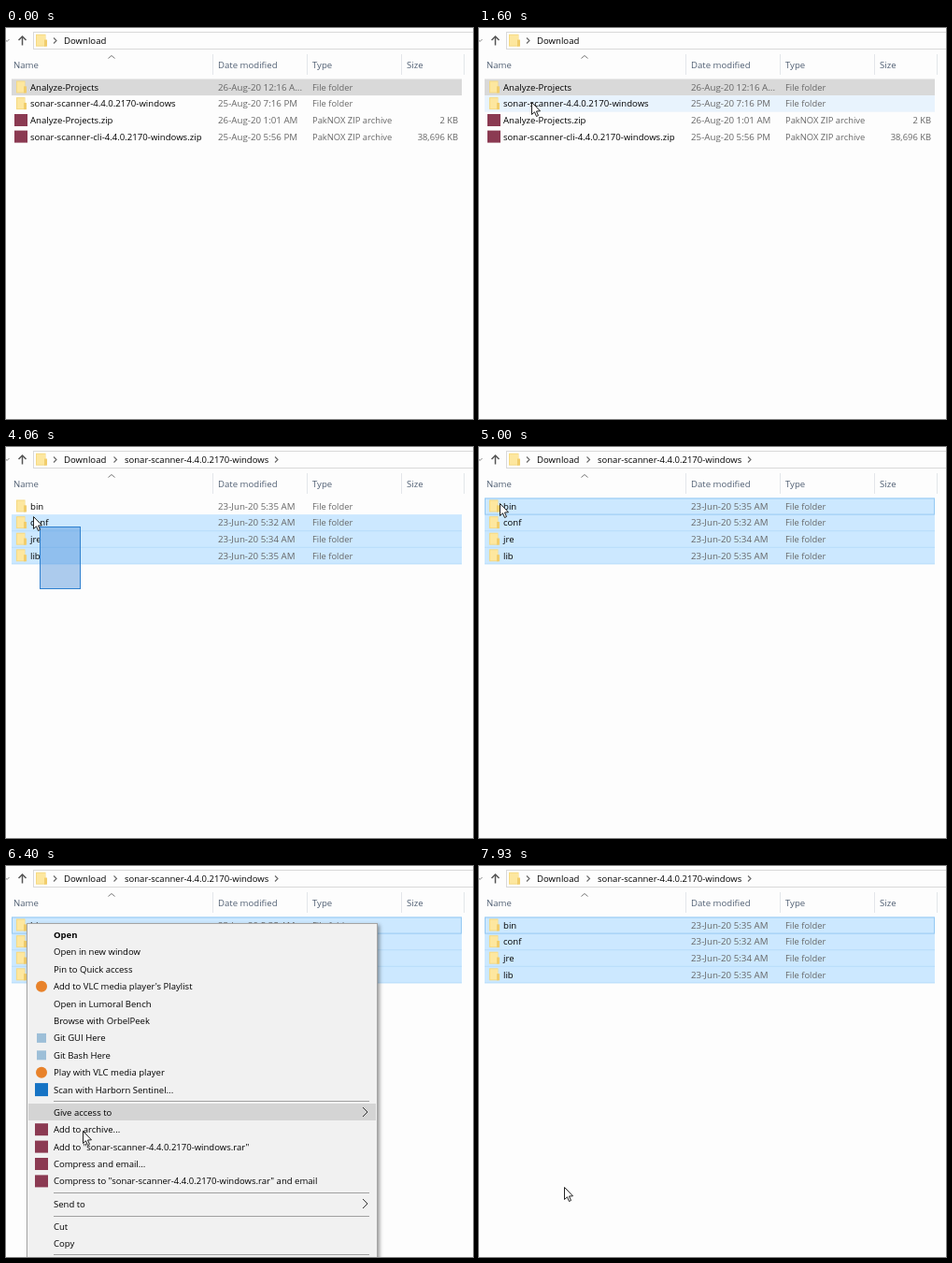
These frames come from a looping animation (500 by 418 pixels, 8000 ms). An HTML page with a canvas:

```html
<!DOCTYPE html>
<html lang="en">
<head>
<meta charset="utf-8">
<title>File browser</title>
<style>
html, body { margin: 0; width: 100%; height: 100%; overflow: hidden; background: #fdfdfd; }
canvas { display: block; width: 500px; height: 418px; }
</style>
</head>
<body>
<canvas id="stage" width="500" height="418"></canvas>
<script>
const ctx = document.getElementById('stage').getContext('2d');
const LOOP = 8000;
const FONT = '"Open Sans", "Noto Sans", sans-serif';
const ROW_TOP = 54.5, ROW_H = 17.6;

// Moments of the interaction, in ms
const APPEAR = 780, ENTER = 2100, DRAG = 3600, RELEASE = 4450, MENU = 5560, CLOSE = 7560;

// Pointer path: time, x, y
const PATH = [
  [780, 85, 127], [980, 82, 126], [1400, 56, 79], [3080, 56, 79],
  [3460, 75, 132], [3560, 79, 151], [3680, 79, 151], [4060, 29, 74],
  [4200, 22, 60], [5700, 22, 60], [6400, 82, 283], [6950, 85, 381],
  [7200, 86, 398], [7580, 86, 398], [7900, 91, 343]
];

const ROOT = [
  ['Analyze-Projects', '26-Aug-20 12:16 A...', 'File folder', ''],
  ['sonar-scanner-4.4.0.2170-windows', '25-Aug-20 7:16 PM', 'File folder', ''],
  ['Analyze-Projects.zip', '26-Aug-20 1:01 AM', 'PakNOX ZIP archive', '2 KB'],
  ['sonar-scanner-cli-4.4.0.2170-windows.zip', '25-Aug-20 5:56 PM', 'PakNOX ZIP archive', '38,696 KB']
];
const INNER = [
  ['bin', '23-Jun-20 5:35 AM', 'File folder', ''],
  ['conf', '23-Jun-20 5:32 AM', 'File folder', ''],
  ['jre', '23-Jun-20 5:34 AM', 'File folder', ''],
  ['lib', '23-Jun-20 5:35 AM', 'File folder', '']
];
const INNER_TITLE = ROOT[1][0];

// Menu groups: centre of the first line, then label and icon pairs
const PITCH = 18.4;
const GROUPS = [
  [73.5, ['Open'], ['Open in new window'], ['Pin to Quick access'],
    ["Add to VLC media player's Playlist", 'player'], ['Open in Lumoral Bench'],
    ['Browse with OrbelPeek'], ['Git GUI Here', 'git'], ['Git Bash Here', 'git'],
    ['Play with VLC media player', 'player'], ['Scan with Harborn Sentinel...', 'shield']],
  [263, ['Give access to', 'sub']],
  [281.7, ['Add to archive...', 'pack'], ['Add to "sonar-scanner-4.4.0.2170-windows.rar"', 'pack'],
    ['Compress and email...', 'pack'],
    ['Compress to "sonar-scanner-4.4.0.2170-windows.rar" and email', 'pack']],
  [361, ['Send to', 'sub']],
  [385, ['Cut'], ['Copy']]
];
const ITEMS = GROUPS.flatMap(([top, ...lines]) =>
  lines.map(([label, icon], i) => ({ label, icon, y: top + i * PITCH })));
const DIVIDERS = [251, 349, 374, 415];

function rect(x, y, w, h, fill) {
  ctx.fillStyle = fill;
  ctx.fillRect(x, y, w, h);
}

function frame(x, y, w, h, color) {
  ctx.strokeStyle = color;
  ctx.lineWidth = 1;
  ctx.strokeRect(x + .5, y + .5, w - 1, h - 1);
}

function line(color, width, ...pts) {
  ctx.beginPath();
  for (let i = 0; i < pts.length; i += 2) ctx.lineTo(pts[i], pts[i + 1]);
  ctx.strokeStyle = color;
  ctx.lineWidth = width;
  ctx.stroke();
}

function text(str, x, mid, color = '#000', size = 9.6, align = 'left', weight = 400) {
  ctx.font = `${weight} ${size}px ${FONT}`;
  ctx.textAlign = align;
  ctx.fillStyle = color;
  ctx.fillText(str, x, mid + 3.5);
}

function pointer(t) {
  if (t <= PATH[0][0]) return { x: PATH[0][1], y: PATH[0][2] };
  for (let i = 1; i < PATH.length; i++) {
    const [t0, x0, y0] = PATH[i - 1], [t1, x1, y1] = PATH[i];
    if (t < t1) {
      const k = (t - t0) / (t1 - t0);
      return { x: x0 + (x1 - x0) * k, y: y0 + (y1 - y0) * k };
    }
  }
  const last = PATH[PATH.length - 1];
  return { x: last[1], y: last[2] };
}

function folder(x, mid, w, h) {
  const y = mid - h / 2;
  rect(x, y, w - 1.5, h, '#f6da82');
  rect(x + 1, y + 1, w - 3, h - 2, '#fde79f');
  rect(x + w - 3, y + h * .45, 3, h * .55, '#f1cd6c');
}

function icon(kind, x, y) {
  if (kind === 'player') {
    ctx.beginPath();
    ctx.arc(x, y, 6, 0, Math.PI * 2);
    ctx.fillStyle = '#e8822a';
    ctx.fill();
  } else if (kind === 'git') {
    rect(x - 5, y - 5, 10, 10, '#9dbfd8');
  } else if (kind === 'shield') {
    rect(x - 7, y - 7, 14, 14, '#1673c4');
  } else if (kind === 'pack') {
    rect(x - 7, y - 6.5, 14, 13, '#8b3a52');
  }
}

function drawBar(inside) {
  line('#8a8a8a', 1, -1, 12, 1, 14.5, 3.5, 12);
  line('#555', 1.5, 17.5, 18.5, 17.5, 9);
  line('#555', 1.5, 13.5, 13, 17.5, 9, 21.5, 13);
  frame(29, 4, 480, 19, '#d9d9d9');
  folder(32, 13.2, 12, 13);
  const crumb = x => line('#666', 1.1, x, 10.5, x + 3, 13.5, x, 16.5);
  crumb(51);
  text('Download', 62, 13.5);
  if (inside) {
    crumb(115.5);
    text(INNER_TITLE, 127, 13.5, '#000', 9.5);
    crumb(288);
  }
}

function drawHeader() {
  [['Name', 8], ['Date modified', 227], ['Type', 328], ['Size', 429]]
    .forEach(([label, x]) => text(label, x, 39.5, '#505f73'));
  [221, 322, 423, 490].forEach(x => rect(x, 28, 1, 22, '#e3e6ea'));
  line('#777', 1, 109.5, 32.5, 113, 29.5, 116.5, 32.5);
}

const rowAt = y => Math.floor((y - ROW_TOP) / ROW_H);

function rowStyle(i, t, p) {
  if (t < ENTER) {
    if (i === 0) return { fill: '#d9d9d9' };
    return t >= APPEAR && rowAt(p.y) === i ? { fill: '#e8f3fd' } : {};
  }
  if (t < DRAG) return rowAt(p.y) === i ? { fill: '#e5f3ff' } : {};
  if (i < rowAt(p.y) && t < RELEASE) return {};
  return { fill: '#cce8ff', edge: i === 0 ? '#94c9f3' : '#b5dcfa' };
}

function drawRows(t, p) {
  const rows = t < ENTER ? ROOT : INNER;
  const styles = rows.map((_, i) => rowStyle(i, t, p));
  const top = i => ROW_TOP + i * ROW_H;
  styles.forEach(({ fill }, i) => fill && rect(6, top(i), 482, ROW_H, fill));
  styles.forEach(({ edge }, i) => {
    if (edge && i === 0) frame(6, top(i), 482, ROW_H + .5, edge);
    else if (edge) rect(6, top(i + 1) - .5, 482, 1, edge);
  });
  rows.forEach(([name, date, type, size], i) => {
    const mid = 63.3 + i * ROW_H;
    if (type === 'File folder') folder(11, mid - .3, 11, 13);
    else icon('pack', 16, mid);
    text(name, 26, mid);
    text(date, 227, mid, '#666', 9.75);
    text(type, 328, mid, '#666', 9.4);
    text(size, 484, mid, '#666', 9.4, 'right');
  });
}

function drawBand(t) {
  if (t < DRAG || t >= RELEASE) return;
  const { x, y } = pointer(t - 55);
  const left = Math.round(x), top = Math.round(y);
  const w = 80 - left, h = 152 - top;
  if (w < 3) return;
  rect(left, top, w, h, 'rgba(60, 135, 215, .42)');
  frame(left, top, w, h, '#2f80cf');
}

function drawMenu(t) {
  if (t < MENU || t >= CLOSE) return;
  ctx.save();
  ctx.shadowColor = 'rgba(0, 0, 0, .4)';
  ctx.shadowBlur = 4;
  ctx.shadowOffsetX = 2;
  ctx.shadowOffsetY = 2;
  rect(22, 61, 376, 380, '#f1f1f1');
  ctx.restore();
  frame(22, 61, 376, 380, '#a5a5a5');
  const hoverY = pointer(t - 65).y;
  for (const { label, icon: kind, y } of ITEMS) {
    if (t > MENU + 200 && Math.abs(hoverY - y) < 9.2) rect(24, y - 9, 372, 18, '#d4d4d4');
    icon(kind, 38, y);
    text(label, 51, y, '#000', 9.52, 'left', label === 'Open' ? 700 : 400);
    if (kind === 'sub') line('#333', 1, 382, y - 5, 387, y, 382, y + 5);
  }
  DIVIDERS.forEach(y => rect(51, y, 338, 1, '#a0a0a0'));
}

function drawPointer({ x, y }) {
  ctx.save();
  ctx.translate(Math.round(x) + .5, Math.round(y) + .5);
  ctx.beginPath();
  [[0, 0], [0, 13], [3, 10.3], [5, 15], [7, 14], [5, 9.5], [9, 9.3]]
    .forEach(([a, b]) => ctx.lineTo(a, b));
  ctx.closePath();
  ctx.fillStyle = '#fff';
  ctx.fill();
  ctx.strokeStyle = '#222';
  ctx.lineWidth = 1;
  ctx.stroke();
  ctx.restore();
}

function draw(t) {
  const p = pointer(t);
  rect(0, 0, 500, 418, '#fdfdfd');
  drawBar(t >= ENTER);
  drawHeader();
  drawRows(t, p);
  drawBand(t);
  drawMenu(t);
  if (t >= APPEAR) drawPointer(p);
}

const start = performance.now();
function tick() {
  draw((performance.now() - start) % LOOP);
  requestAnimationFrame(tick);
}
tick();
</script>
</body>
</html>
```
